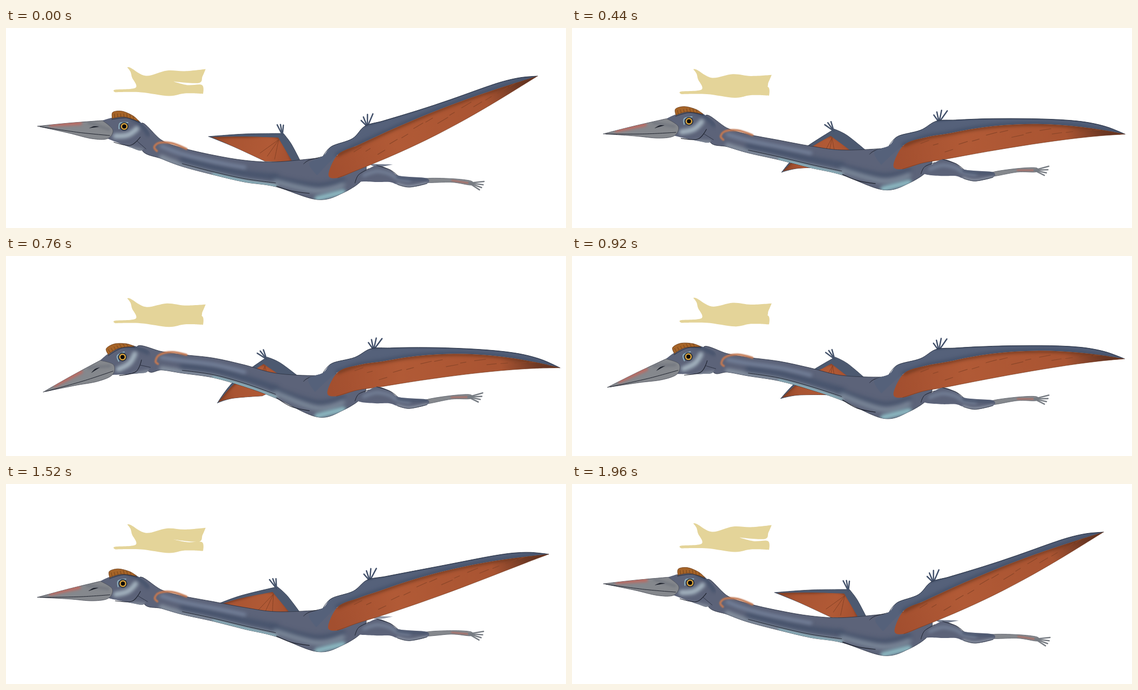
An HTML page with a canvas that plays this animation: 1080 px wide and 387 px high, repeating every 2000 ms.

```html
<!DOCTYPE html>
<html lang="en">
<head>
<meta charset="utf-8">
<title>Gliding pterosaur</title>
<style>
  html, body { margin: 0; width: 100%; height: 100%; overflow: hidden; background: #fff; }
  canvas { display: block; width: 100%; height: 100%; }
</style>
</head>
<body>
<canvas id="stage" width="1080" height="387"></canvas>
<script>
const ctx = document.getElementById('stage').getContext('2d');
const LOOP = 2000, STEP = 40, RAD = Math.PI / 180;
const SLATE = '#5c6379', DARK = '#46536c', PALE = '#76839a', INK = '#1b1f2a', GREY = '#85888d', TEAL = '#8dbac3';

const lerp = (a, b, k) => a + (b - a) * k;
const clamp = v => Math.max(0, Math.min(1, v));
const smooth = v => (v = clamp(v), v * v * (3 - 2 * v));
const arch = s => Math.sin(Math.PI * s);

// Points are "x,y" or "x,y,half-height"; a trailing "!" marks a sharp corner.
const parse = text => text.split(' ').map(item => {
  const [x, y, h] = item.split(',').map(parseFloat);
  return { x, y, h, sharp: item.endsWith('!') };
});
const sample = (curve, steps = 10) => Array.from({ length: steps + 1 }, (_, i) => curve(i / steps));

// A line running along a spine; offset -1 is its upper edge and 1 its lower edge.
const along = (spine, offset, from = 0, to = spine.length) =>
  spine.slice(from, to).map(p => ({ x: p.x, y: p.y + offset * p.h }));
const ribbon = spine => [...along(spine, -1), ...along(spine, 1).reverse()];

const trunk = parse('262,210,26 300,235,18 340,250,18 400,265,19 460,277,21 520,283,24 600,292,40 650,283,36 690,272,18');
const thigh = parse('676,297,1 690,288,9 715,282,16 740,286,12 755,294,9 778,298,10 812,296,5');
const shin = parse('811,295,4 860,295,3.5 897,300,4');
const skull = parse('186,179! 208,173 240,171 260,183 278,208 264,236 240,231 196,214!');
const beak = parse('61,190! 120,184 186,179! 206,197 196,214 165,214 120,203');
const crest = parse('205,175! 206,163 224,161 245,170 257,181! 228,172');
const farWing = parse('391,210! 460,205 535,204! 550,224 568,258! 500,258! 440,230');
const farSkin = parse('396,211! 460,210 525,212! 553,260! 500,258! 440,230');
const cloak = parse('234,76! 241,77 270,92 310,82 345,83 385,79! 379,93 371,106 323,103! 350,110 378,110 380,127! ' +
  '345,126 314,131 260,124 211,124! 210,119 250,115 243,95 240,84');

// Near wing edges from the wrist or shoulder (s = 0) to the tip (s = 1).
const leadEdge = s => ({ x: 692 + 333 * s, y: 190 - 97 * s - 9 * arch(s ** 3) });
const skinTop = s => ({ x: 640 + 385 * s, y: 245 - 152 * s - 10 * arch(s), sharp: s === 1 });
const trailEdge = s => ({ x: 640 + 385 * s, y: 290 - 197 * s + 14 * arch(s), sharp: s === 1 });
const skin = [...sample(skinTop), ...sample(trailEdge).reverse().slice(1), ...parse('622,284')];
const limb = [...parse('600,285! 585,262 612,247 628,229 668,214'), ...sample(leadEdge), ...sample(skinTop).reverse()];

function seeded(seed) {
  return () => (seed = seed * 16807 % 2147483647) / 2147483647;
}

// Fast downstroke followed by a slow recovery.
function stroke(time) {
  const t = (time + LOOP) % LOOP;
  return t < 560 ? t / 560 : Math.max(0, (1960 - t) / 1400);
}

function rotate(x, y, cx, cy, angle, scale = 1) {
  const c = Math.cos(angle) * scale, s = Math.sin(angle) * scale;
  const dx = x - cx, dy = y - cy;
  return [cx + dx * c - dy * s, cy + dx * s + dy * c];
}

function makeWarps(flap, nod) {
  const bend = (nod - 0.114) / 0.772;
  const lifted = warp => (x, y) => {
    const [u, v] = warp(x, y);
    return [u, v - 24 * flap];
  };
  return {
    body: lifted((x, y) => {
      const s = clamp((560 - x) / 280);
      const neckY = y - bend * (23 * arch(s) + 6 * s * s);
      const [hx, hy] = rotate(x, y, 286, 211, -21 * RAD * bend);
      const w = smooth((305 - x) / 50);
      return [lerp(x, hx, w), lerp(neckY, hy, w)];
    }),
    near: lifted((x, y) => {
      const r = Math.hypot(x - 630, y - 250);
      const turn = flap * (9.1 + 0.0334 * r) * Math.min(1, r / 90);
      return rotate(x, y, 630, 250, turn * RAD, 1 + 0.037 * flap);
    }),
    far: lifted((x, y) => {
      const r = Math.hypot(x - 565, y - 262);
      const turn = -flap * (26.5 + 0.059 * r);
      return rotate(x, y, 565, 262, turn * RAD, 1 + flap * (0.17 - 0.0028 * (r - 78)));
    }),
    leg: lifted((x, y) => [x - 3 * flap * clamp((x - 810) / 110),
      y + flap * (9 * smooth((x - 665) / 30) - 0.2 * Math.max(0, x - 810))]),
    cloak: (x, y) => {
      const flop = y < 108 ? clamp((x - 265) / 105) : 0;
      return [x, y + 3.3 * (flap + nod) + 10 * flap * flop];
    }
  };
}

function trace(shape, warp, closed) {
  const points = (typeof shape === 'string' ? parse(shape) : shape).map(p => {
    const [x, y] = warp(p.x, p.y);
    return { x, y, sharp: p.sharp };
  });
  const n = points.length;
  const at = i => points[(i + n) % n];
  const tangent = i => {
    if (at(i).sharp || (!closed && (i === 0 || i === n - 1))) return [0, 0];
    return [(at(i + 1).x - at(i - 1).x) / 6, (at(i + 1).y - at(i - 1).y) / 6];
  };
  ctx.beginPath();
  ctx.moveTo(points[0].x, points[0].y);
  for (let i = 0; i < (closed ? n : n - 1); i++) {
    const a = at(i), b = at(i + 1), ta = tangent(i), tb = tangent(i + 1);
    ctx.bezierCurveTo(a.x + ta[0], a.y + ta[1], b.x - tb[0], b.y - tb[1], b.x, b.y);
  }
  if (closed) ctx.closePath();
}

function line(shape, warp, color, width = 1, blur = 0) {
  trace(shape, warp, false);
  ctx.strokeStyle = color;
  ctx.lineWidth = width;
  ctx.filter = blur ? `blur(${blur}px)` : 'none';
  ctx.stroke();
  ctx.filter = 'none';
}

// Fills a shape, then paints its shading inside it.
function fill(shape, warp, color, edge, shade) {
  trace(shape, warp, true);
  ctx.fillStyle = color;
  ctx.fill();
  if (edge) {
    ctx.strokeStyle = edge;
    ctx.lineWidth = 0.9;
    ctx.stroke();
  }
  if (shade) {
    ctx.save();
    ctx.clip();
    shade();
    ctx.restore();
  }
}

// Claws or toes spread between two angles.
function fan(warp, x, y, angles, lengths, count, color) {
  for (let i = 0; i < count; i++) {
    const k = i / (count - 1), angle = lerp(...angles, k) * RAD, length = lerp(...lengths, k);
    const tip = { x: x + length * Math.cos(angle), y: y + length * Math.sin(angle) };
    line([{ x, y }, tip], warp, color, 2.6);
  }
}

function skinGradient(warp, from, to, tipColor) {
  const g = ctx.createLinearGradient(...warp(...from), ...warp(...to));
  g.addColorStop(0, '#a34f2f');
  g.addColorStop(0.3, '#b15a36');
  g.addColorStop(0.75, '#a95432');
  g.addColorStop(1, tipColor);
  return g;
}

function drawFarWing(warp) {
  fill(farWing, warp, '#4c5970', '#333d50');
  fill(farSkin, warp, skinGradient(warp, [552, 255], [391, 210], '#8f4426'), null, () => {
    line('396,211 460,210 525,212 553,260', warp, '#74371f', 4, 2);
    for (let i = 0; i < 3; i++) line([{ x: 526, y: 216 }, { x: 518 - 14 * i, y: 254 - 6 * i }], warp, '#834024', 1);
  });
  fan(warp, 533, 207, [-117, -84], [22, 19], 3, '#45536b');
}

function drawBody(warp) {
  fill(ribbon(trunk), warp, SLATE, '#2c3342', () => {
    const band = (offset, from, to, ...style) => line(along(trunk, offset, from, to), warp, ...style);
    band(0.85, 1, 6, '#838e9d', 10, 3);
    band(0.95, 3, 6, TEAL, 5, 2);
    band(0.2, 2, 6, DARK, 11, 4);
    band(-0.35, 1, 5, '#74819a', 7, 3);
    band(0.3, 5, 8, DARK, 9, 4);
    band(0.58, 5, 8, '#8290a0', 8, 4);
    band(0.95, 6, 8, TEAL, 10, 3);
  });
  line(along(trunk, 0.7, 2, 6), warp, INK);
  line('522,306 550,315 585,320', warp, INK, 1.2);
  line('348,234 320,223 296,222 286,230 291,238', warp, '#c27852', 4, 0.8);
  line('574,263 584,256 610,249', warp, INK);
}

function drawHead(warp) {
  fill(skull, warp, SLATE, null, () => {
    line('242,174 260,186 274,206', warp, DARK, 8, 3);
    line('211,209 235,207 252,195', warp, '#a3b2be', 10, 3);
    line('235,232 262,238', warp, '#858e9b', 8, 3);
  });
  fill(beak, warp, GREY, '#4c505a', () => {
    line('87,187 143,184', warp, '#bd6a61', 7, 2.5);
    line('160,183 198,196', warp, '#757981', 6, 2);
  });
  line('66,191 140,202 200,208', warp, INK);
  fill('160,194! 170,190 180,191!', warp, INK);
  line('208,221 240,227 259,211', warp, INK, 1.1);
  line('253,219 270,234', warp, '#262c3a', 0.9);

  fill(crest, warp, '#a66428', '#6a3c18', () => {
    for (let x = 209; x < 250; x += 6) line([{ x, y: 166 }, { x: x + 1, y: 176 }], warp, '#6e401c');
  });
  line('204,177 232,174 257,183', warp, '#2e3444', 1.2);

  line('218,195 220,184 235,183', warp, '#8fb4c3', 2, 0.5);
  const [x, y] = warp(228, 190.5);
  for (const [radius, color] of [[8.3, '#27303d'], [6.5, '#dfa63c'], [4, '#080808']]) {
    ctx.beginPath();
    ctx.arc(x, y, radius, 0, Math.PI * 2);
    ctx.fillStyle = color;
    ctx.fill();
  }
}

function drawNearWing(warp) {
  fan(warp, 697, 191, [-135, -67], [17, 27], 4, '#42506a');
  fill(limb, warp, '#55617a', null, () => {
    line(sample(skinTop), warp, DARK, 10, 3);
    line(sample(leadEdge), warp, DARK, 3, 1);
  });
  line([...parse('612,247 628,229 668,214'), ...sample(leadEdge)], warp, '#252e40');
  fill(skin, warp, skinGradient(warp, [630, 270], [1022, 95], '#4e2a1e'), null, () => {
    line(sample(skinTop), warp, '#71391f', 6, 3);
    const random = seeded(11);
    for (let i = 0; i < 14; i++) {
      const s = 0.08 + 0.06 * i, k = lerp(0.2, 0.8, random()), size = 8 + 14 * random();
      const x = skinTop(s).x, y = lerp(skinTop(s).y, trailEdge(s).y, k);
      line([{ x, y }, { x: x + size, y: y - size * 0.6 }], warp, '#8a4629', 1.2, 0.6);
    }
  });
  line(sample(trailEdge), warp, '#71391f', 0.7);
}

function drawLeg(warp) {
  fill(ribbon(shin), warp, GREY, '#60656e');
  line('860,295 892,300', warp, '#b06c62', 2.5, 0.8);
  fan(warp, 893, 300, [-6, 33], [29, 24], 4, '#767b82');
  fill(ribbon(thigh), warp, SLATE, null, () => {
    line(along(thigh, -0.3, 1, 6), warp, PALE, 6, 3);
    line(along(thigh, 0.8, 4), warp, '#8d95a4', 4, 2);
    line(along(thigh, -0.6, 4), warp, DARK, 4, 2);
  });
  line('673,300 680,284 700,272', warp, INK);
  line(along(thigh, -1, 2, 5), warp, INK);
  line(along(thigh, 1, 4), warp, '#2c3342', 0.9);
}

function frame(now) {
  const time = Math.floor(now / STEP) * STEP % LOOP;
  const flap = stroke(time), nod = stroke(time - 200);
  const warps = makeWarps(flap, nod);
  ctx.fillStyle = '#fff';
  ctx.fillRect(0, 0, 1080, 387);
  ctx.lineJoin = ctx.lineCap = 'round';
  fill(cloak, warps.cloak, '#e4d499');
  drawFarWing(warps.far);
  ctx.globalAlpha = clamp(1.6 - 2.6 * flap);
  fill('700,263! 746,264! 716,269', warps.body, '#747d90');
  ctx.globalAlpha = 1;
  drawBody(warps.body);
  drawHead(warps.body);
  drawNearWing(warps.near);
  drawLeg(warps.leg);
  requestAnimationFrame(frame);
}
requestAnimationFrame(frame);
</script>
</body>
</html>
```
